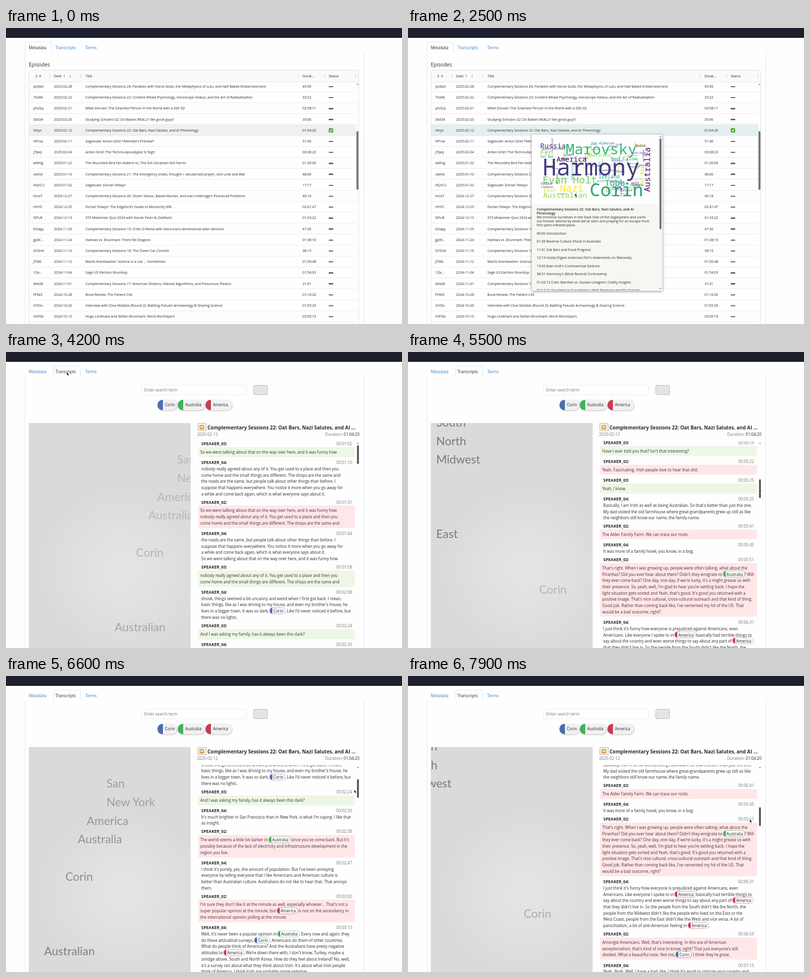
Animation, 800 px wide and 600 px high, one loop 8000 ms. Source, as an HTML page:

```html
<!DOCTYPE html>
<html lang="en">
<head>
<meta charset="utf-8">
<title>Episode browser</title>
<style>
html, body { margin: 0; width: 100%; height: 100%; overflow: hidden; }
#stage { position: relative; width: 800px; height: 600px; overflow: hidden; background: #fefefe;
  font: 6.95px/12px "Open Sans", "Noto Sans", sans-serif; color: #2a2a2e; }
#stage div { position: absolute; box-sizing: border-box; }
.t { white-space: pre; height: 12px; }
.m { font-weight: 500; }
.b { font-weight: 600; }
.bb { font-weight: 700; }
.s8 { font-size: 8.05px; }
.blue { color: #2f7fd0; }
.grey { color: #75757a; }
.line { background: #e4e6ea; }
.thumb { background: #77777d; border-radius: 2px; }
.up, .down { width: 4px; height: 2px; background: #66666c; clip-path: polygon(50% 0, 100% 100%, 0 100%); }
.down { transform: scaleY(-1); }
u { color: #2f74c8; text-underline-offset: 1px; text-decoration-thickness: .6px; }
.cloud { font-family: "Noto Sans Mono", "DejaVu Sans Mono", monospace; white-space: pre; line-height: 1; }
.word { font: 23.3px/30px Lato, "Open Sans", sans-serif; color: #404044; white-space: pre; }
.tag { padding: 0 3px 0 7px; border-radius: 5px; color: #2a2a2e; box-shadow: 0 0 3px var(--c);
  background: linear-gradient(90deg, var(--c) 5px, #fafafa 5px); }
.pill { height: 21px; border-radius: 10px; box-shadow: 1px 1px 3px #bbbbbf; overflow: hidden;
  background: linear-gradient(90deg, var(--c) 11px, #f1f1f2 11px); }
</style>
</head>
<body>
<div id="stage"></div>
<script>
const LOOP = 8000;
const stage = document.getElementById('stage');

function box(parent, x, y, w, h, css = '', cls = '') {
  const el = document.createElement('div');
  el.className = cls;
  el.style.cssText = `left:${x}px;top:${y}px;width:${w}px;height:${h}px;${css}`;
  parent.append(el);
  return el;
}

// Text whose middle line is at y.
function text(parent, x, y, html, cls = '', css = '') {
  const el = document.createElement('div');
  el.className = 't ' + cls;
  el.style.cssText = `left:${x}px;top:${y - 6}px;${css}`;
  el.innerHTML = html;
  parent.append(el);
  return el;
}

// Clipped window whose contents still use stage coordinates.
function view(parent, x, y, w, h, css = '') {
  return box(box(parent, x, y, w, h, 'overflow:hidden;' + css), -x, -y, 800, 600);
}

const layer = () => box(stage, 0, 0, 800, 600);

// Value on a track of [time, value, ...] stops, with optional easing.
function track(stops, t, ease = p => p) {
  let i = 0;
  while (i < stops.length - 2 && t >= stops[i + 1][0]) i++;
  const [a, b] = [stops[i], stops[i + 1]];
  const p = ease(Math.min(1, Math.max(0, (t - a[0]) / (b[0] - a[0]))));
  return a.slice(1).map((v, k) => v + (b[k + 1] - v) * p);
}
const smooth = p => p * p * (3 - 2 * p);

// ---- Frame and tabs
box(stage, 0, 0, 800, 20, 'background:#1e1f2d');
box(stage, 37.5, 49, 1, 551, '', 'line');
box(stage, 722, 49, 1, 551, '', 'line');
const tabBox = box(stage, 38, 28, 53, 22, 'border:1px solid #e4e6ea;border-bottom:0;border-radius:3px 3px 0 0');
const tabs = [['Metadata', 46], ['Transcripts', 100], ['Terms', 160]]
  .map(([name, x]) => text(stage, x, 39.5, name, 's8'));

// ---- Metadata page
const CS = 'Complementary Sessions ';
const TITLE = CS + '22: Oat Bars, Nazi Salutes, and AI Phrenology';
const episodes = [
  ['qU6ah', '2025-02-28', CS + '24: Parables with Norse Gods, the Metaphysics of Lulu, and Half Baked Embarrassment', '45:56'],
  ['7sVAK', '2025-02-22', CS + '23: Content Whale Psychology, Horoscope Haikus, and the Art of Radicalisation', '33:22'],
  ['yhzQq', '2025-02-21', 'Mikel Dorvan: The Smartest Person in the World with a 200 IQ!', '02:58:11'],
  ['S6d34', '2025-02-20', 'Studying Scholars 32: Do Babies REALLY like good guys?', '35:06'],
  ['Veiyn', '2025-02-12', TITLE, '01:04:20'],
  ['NPrxa', '2025-02-11', 'Sagescale: Anton Griel *Members Preview*', '51:40'],
  ['j7Jwq', '2025-02-04', 'Anton Griel: The Techno-Apocalypse is Nigh', '03:08:23'],
  ['w6lHg', '2025-01-22', 'The Wounded Bird Fen Alderin vs. The Evil Ukrainian Bot Farms', '01:20:00'],
  ['cwfo0', '2025-01-10', CS + '21: The emergency snake, thought = secularised prayer, and Love and War', '48:00'],
  ['HQrCU', '2025-01-02', 'Sagescale: Dorian Felwyn', '17:17'],
  ['hrosT', '2024-12-27', CS + "20: Stolen Valour, Based Murder, and Ivan Holbridge's Phonecall Problems", '40:18'],
  ['rlhYD', '2024-12-25', "Dorian Felwyn: The Edgelord's Guide to Monarchy 90K", '02:41:47'],
  ['5iPuR', '2024-12-13', 'STS Midwinter Quiz 2024 with Norah Pevin &amp; Oddfacts', '01:33:22'],
  ['bOapy', '2024-11-29', CS + '19: Critic-O-Rama with extra trans-dimensional alien demons', '47:30'],
  ['gpW…', '2024-11-24', 'Hallows vs. Brunmark: There Be Dragons', '01:38:10'],
  ['GYSH4', '2024-11-16', CS + '18: The Clown Car Cometh', '38:15'],
  ['JTlWL', '2024-11-12', 'Marlis Krantzweiler: Science is a Liar ... Sometimes', '01:50:48'],
  ['1Qx…', '2024-11-04', 'Sage US Election Roundup', '01:54:03'],
  ['dhk06', '2024-11-01', CS + '17: American Dreams, Vidnest Algorithms, and Poisonous Plastics', '31:31'],
  ['FF6k5', '2024-10-28', 'Book Review: The Patient Cell', '01:16:20'],
  ['OiY0o', '2024-10-20', 'Interview with Clive Mobble (Round 2): Battling Pseudo Archaeology &amp; Sharing Science', '01:55:29'],
  ['rNFGb', '2024-10-15', 'Hugo Lindmark and Stefan Brunmark: Word Worshipers', '03:05:19'],
];
const ROW = 22.2, TOP = 107.6, PICKED = 4;
const meta = layer();
text(meta, 46, 73.5, 'Episodes', 'm', 'font-size:10.3px');
box(meta, 46, 85, 667, 540, 'border:1px solid #dfe1e5;border-radius:4px');
box(meta, 47, 86, 665, 24, 'background:#fafafb;border-bottom:1px solid #e8e9ec');
[['2  4', 59], ['Date  1', 97], ['Title', 160.5], ['Durat…', 599], ['Status', 652]]
  .forEach(([s, x]) => text(meta, x, 97.5, s, 'm'));
text(meta, 127, 97, '↓', '', 'font-size:9px');
[88, 151, 590, 643, 706].forEach(x => box(meta, x, 93, 1, 9, 'background:#d5d6da'));

const rows = episodes.map(([id, date, title, length], i) => {
  const y = TOP + ROW * i;
  const row = box(meta, 47, y, 661, ROW, 'border-bottom:1px solid #ebecef');
  const mid = y + ROW / 2 + .3;
  [[id, 55], [date, 97], [title, 160.5], [length, 599]].forEach(([s, x]) => text(meta, x, mid, s));
  if (i === PICKED) {
    box(meta, 652, mid - 4.5, 9, 9, 'background:#4cab3e;border-radius:1.5px').innerHTML =
      '<svg width="9" height="9" style="display:block"><path d="M2 4.6L3.8 6.6L7 2.2" fill="none" stroke="#fff" stroke-width="1.3"/></svg>';
  } else box(meta, 652, mid - 1.3, 9, 2.6, 'background:#626267;border-radius:.5px');
  return row;
});
box(meta, 708, 113, 4, 2, '', 'up');
box(meta, 708, 209, 4, 119, '', 'thumb');

// ---- Popup
const popup = box(meta, 0, 0, 800, 600);
box(popup, 250, 215.5, 264, 317, 'background:#f6f6f2;box-shadow:0 1px 5px #8a8a90');
const popView = view(popup, 250, 216, 257, 316);
const popBody = box(popView, 0, 0, 800, 600);
box(popBody, 250, 216, 257, 141, 'background:#fefefe');

// Centre of the word, size, colour, quarter turn.
function cloudWord(s, x, y, size, color, turned) {
  const el = document.createElement('div');
  el.className = 'cloud';
  el.style.cssText = `left:${x}px;top:${y}px;font-size:${size}px;color:${color};` +
    `transform:translate(-50%,-50%)${turned ? ' rotate(-90deg)' : ''}`;
  el.textContent = s;
  popBody.append(el);
}
let seed = 7;
const rand = () => (seed = seed * 16807 % 2147483647) / 2147483647;
const tints = ['#90d743', '#35b779', '#443983', '#d8e219', '#31688e', '#481f70'];
const tiny = ['culture', 'people', 'Ireland', 'think', 'podcast', 'America', 'audience', 'Northern', 'idea', 'Great', 'world'];
for (let i = 0; i < 75; i++) {
  cloudWord(tiny[i % tiny.length], 276 + rand() * 200, 233 + rand() * 106, 3.6 + rand() * 1.8, tints[i % 6], rand() < .4);
}
[
  ['Russia', 293, 239, 14.4, '#482878'], ['Marovsky', 390, 244.5, 29.8, '#35b779'],
  ['Fen', 280, 252, 14.4, '#90d743'], ['America', 330.5, 265, 14.5, '#440154'],
  ['Harmony', 370, 281, 46.7, '#443983'], ['Evan Holt', 327, 307, 20.4, '#6ece58'],
  ['Tobb', 418, 313, 17, '#1f9e89'], ['Corin', 421, 328, 36, '#28a374'],
  ['Nazi', 331, 325, 20, '#fde725'], ['Australian', 317.5, 338, 14.8, '#90d743'],
  ['Australia', 483, 287, 16.8, '#450b58', 1], ['Ned Calow', 436.5, 265, 9.8, '#2fa97f'],
  ['Ireland', 406, 301, 10, '#1f9e89'], ['Americans', 386, 258, 8.7, '#6ece58'],
  ['Volin', 279.5, 316, 7.7, '#443983'], ['Lindgren', 281, 322.5, 5.2, '#443983'],
  ['Fen Alderien', 394, 234, 6.5, '#31688e'], ['Gurus', 470, 237.5, 7, '#440154'],
  ['Dune Harbor', 469, 253, 4.7, '#443983'], ['Rupert Hallowes', 294, 246, 5.2, '#31688e'],
  ['Oat Bar', 281, 260.5, 6.4, '#21918c'], ['South', 323, 258, 6.5, '#1f9e89'],
  ['Truth', 286, 328.5, 8, '#d8e219'], ['Holt', 459, 314.5, 6.6, '#440154'],
  ['Oat Bars', 473, 297, 9.4, '#c2df23', 1], ['American', 332, 290, 7.5, '#35b779', 1],
].forEach(w => cloudWord(...w));

const put = (y, s, cls) => text(popBody, 260, y, s, cls);
TITLE.split(/ (?=Phren)/).forEach((s, i) => put(367.5 + 8.2 * i, s, 'b'));
['We immerse ourselves in the Dark Side of the Sagesphere and come',
 "out forever altered by what we've seen and praying for an escape from",
 'this spirit-infested place.'].forEach((s, i) => put(384 + 8.1 * i, s));
['00:00 Introduction', '01:38 Reverse Culture Shock in Australia', '11:01 Oat Bars and Food Progress',
 "12:14 Vostia Digest endorses Fen's statements on Marovsky", "19:20 Evan Holt's Controversial Gesture",
 "38:31 Harmony's (Most Recent) Controversy", '01:02:12 Colin Marsten vs. Gustav Lindgren: Civility Insights',
 '01:14:21 Sacrilegious Sycophancy: Walt Fenmore and Kip Dorsen', "01:15:55 Frederic Valmon's Sunportal Theories",
 '01:26:52 Leaving the Spirit Infested World', 'The full episode is available for Fundnik subscribers (1hrs 30 mins).',
 'Join us at: <u>https://www.example.com/ReadingTheSages</u>', '<b class="b">Sources</b>',
].forEach((s, i) => put(416.5 + 16.52 * i, s));
['*<u>Vostia Digest posting about Fen</u> and <u>announcing his upcoming</u>', '<u>interview with Volin</u>',
 '*<u>Ned Calow Encounters #2260 - Fen Alderin</u>', "*<u>Video comparing Holt's gesture with other politicians' gestures</u>",
 "*<u>Nola's statement about the lawsuit on her bulletin and Harmony's</u>", '<u>response on his webforum</u>',
 "*<u>Colin Marsten and Lindgren's Chirrup Exchange</u>", "*<u>Walt Fenmore suggesting Brant's achievements are greater than</u>",
 "<u>God's</u>", "*<u>Frederic Valmon's thread on Sunportals</u>",
].forEach((s, i) => {
  const y = 631.5 + 8.05 * i;
  if (s[0] === '*') box(popBody, 270, y - 1, 2.4, 2.4, 'background:#2a2a2e;border-radius:2px');
  text(popBody, 277, y, s.replace('*', ''));
});
box(popup, 508, 219, 4, 2, '', 'up');
box(popup, 508, 527, 4, 2, '', 'down');
const popThumb = box(popup, 508, 224, 4, 184, '', 'thumb');

// ---- Transcripts page
const trans = layer();
const tags = { C: ['Corin', '#4a6db0'], A: ['Australia', '#3fb45c'], U: ['America', '#c63d52'] };
box(trans, 273, 67, 214, 20, 'border:1px solid #ececef;border-radius:3px');
text(trans, 279.5, 77, 'Enter search term', 's8 grey');
box(trans, 500, 67, 29, 20, 'border:1px solid #b9bcc1;border-radius:3px;background:#e2e4e7');
[['C', 306, 39], ['A', 347, 54], ['U', 403, 53]].forEach(([k, x, w]) => {
  box(trans, x, 96.5, w, 21, `--c:${tags[k][1]}`, 'pill');
  text(trans, x + 15, 107, tags[k][0], 's8');
});

const wordView = view(trans, 46, 144, 327, 456,
  'background:radial-gradient(circle at 190px 296px,#e5e5e6 0,#e1e1e2 70px,#dadadb 170px)');

box(trans, 386.5, 144, 18, 16, 'border:1px solid #b4b4b8;border-radius:2px;background:#f0f0f1');
box(trans, 390.5, 147.5, 9.5, 9, 'background:#f39a1e;border-radius:1.5px');
[393, 396].forEach(x => box(trans, x, 150, 1.5, 4, 'background:#fff3e0'));
text(trans, 407, 152.5, TITLE.replace(/Phren.*/, '…'), 'bb', 'font-size:9.9px');
text(trans, 386, 167, '2025-02-12', 's8 grey');
text(trans, 0, 167, '<span class="grey">Duration:</span> 01:04:20', 's8', 'left:auto;right:86px');

const pool = [
  'So we were talking about that on the way over here, and it was funny how',
  'nobody really agreed about any of it. You get used to a place and then you',
  'come home and the small things are different. The shops are the same and',
  'the roads are the same, but people talk about other things than before. I',
  'suppose that happens everywhere. You notice it more when you go away for',
  'a while and come back again, which is what everyone says about it.',
];
// Speaker, time, then text lines or a number of lines of small talk.
const talk = [
  ['3', '01:02', 1], ['4', '01:10', 5], ['2', '01:31', 3], ['4', '01:44', 4], ['3', '01:58', 2],
  ['4', '02:08', "shook, things seemed a bit uncanny and weird when I first got back. I mean,|basic things, like as I was driving to my house, and even my brother's house, he|lives in a bigger town. It was so dark, {C}. Like I'd never noticed it before, but|there was no lights."],
  ['3', '02:24', 'And I was asking my family, has it always been this dark?'],
  ['4', '02:30', "It's much brighter in San Francisco than in New York, is what I'm saying. I like that|as insight."],
  ['2', '02:38', "The world seems a little bit darker in {A} since you've come back. But it's|possibly because of the lack of electricity and infrastructure development in the|region you live."],
  ['4', '02:47', "I think it's purely, yes, the amount of population. But I've been annoying|everyone by telling everyone that I like Americans and American culture is|better than Australian culture. Australians do not like to hear that. That annoys|them."],
  ['2', '03:00', "I'm sure they don't like it at the minute as well, especially whoever... That's not a|super popular opinion at the minute, but {U} is not on the ascendancy in|the international opinion polling at the minute."],
  ['4', '03:13', "Well, it's never been a popular opinion in {A}. Every now and again, they|do these attitudinal surveys, {C}. Americans do them of other countries.|What do people think of Americans? And the Australians have pretty negative|attitudes to {U}. We're down there with, I don't know, Turkey, maybe a|smidge above. South and North Korea. How do they feel about Ireland? No, well,|it's a survey not about what they think about Irish. It's about what Irish people|think of America. I think Irish are probably more negative|than most."],
  ['2', '03:52', 3], ['4', '04:08', 5], ['3', '04:31', 1], ['4', '04:36', 6], ['2', '05:02', 1], ['4', '05:08', 2],
  ['3', '05:19', "Have I ever told you that? Isn't that interesting?"],
  ['2', '05:22', 'Yeah. Fascinating. Irish people love to hear that shit.'],
  ['3', '05:25', 'Yeah, I know.'],
  ['4', '05:25', "Basically, I am Irish as well as being Australian. So that's better than just the one.|My dad visited the old farmhouse where great-grandparents grew up still as like|the neighbors still know our name, the family name."],
  ['2', '05:41', 'The Alder Family Farm. We can trace our roots.'],
  ['4', '05:45', 'It was more of a family hovel, you know, in a bog.'],
  ['2', '05:51', "That's right. When I was growing up, people were often talking, what about the|Piranhas? Did you ever hear about them? Didn't they emigrate to {A}? Will|they ever come back? One day, one day, if we're lucky, it's a might grease us with|their presence. So, yeah, well, I'm glad to hear you're settling back. I hope the|light situation gets sorted and Yeah, that's good. It's good you returned with a|positive image. That's nice cultural, cross-cultural outreach and that kind of thing.|Good job. Rather than coming back like, I've cemented my hit of the US. That|would be a bad outcome, right?"],
  ['4', '06:31', "I just think it's funny how everyone is prejudiced against Americans, even|Americans. Like everyone I spoke to in {U} basically had terrible things to|say about the country and even worse things to say about any part of {U}|that they didn't live in. So the people from the South didn't like the North, the|people from the Midwest didn't like the people who lived on the East or the|West Coast, people from the East didn't like the West and vice versa. A lot of|parochialism, a lot of anti-American feeling in {U}."],
  ['2', '06:59', "Amongst Americans. Well, that's interesting. In this era of American|exceptionalism, that's kind of nice to know, right? That just everyone's still|divided. What a beautiful note. Not me, {C}. I think they're great."],
  ['4', '07:15', "Yeah. Yeah. Well, I have a bad, like, I think it's good to criticize your country and"],
];
// Fill and ink of the shaded speakers.
const shades = { 2: ['#ffe7e9', '#4d2c33'], 3: ['#eef6e6', '#2f3a2c'] };
const talkView = view(trans, 386, 181, 321, 419);
const talkBody = box(talkView, 0, 0, 800, 600);
const LINE = 12.72, headAt = {};
let flowY = 186, next = 0;
for (const [who, time, said] of talk) {
  const lines = typeof said === 'string' ? said.split('|')
    : Array.from({ length: said }, () => pool[next++ % pool.length]);
  const shade = shades[who];
  headAt[time] = flowY;
  text(talkBody, 394.5, flowY, `SPEAKER_0${who}:`, 'bb', 'font-size:8.5px');
  text(talkBody, 0, flowY, '00:' + time, 's8 grey', 'left:auto;right:101px');
  const first = flowY + (shade ? 16.8 : 12.8), last = first + LINE * (lines.length - 1);
  if (shade) box(talkBody, 388, first - 10, 317, last - first + 20, `background:${shade[0]}`);
  lines.forEach((s, i) => text(talkBody, shade ? 392.5 : 394.5, first + LINE * i,
    s.replace(/\{(.)\}/g, (_, k) => `<span class="tag" style="--c:${tags[k][1]}">${tags[k][0]}</span>`),
    's8', shade ? `color:${shade[1]}` : ''));
  flowY = last + (shade ? 21.2 : 17);
}
const early = headAt['02:24'] - 235, late = headAt['05:19'] - 183.5, end = headAt['05:41'] - 222.3;
box(trans, 709, 184, 4, 2, '', 'up');
const talkThumb = box(trans, 709, 209, 4, 38, 'background:#5c5c62', 'thumb');

// Term, x at its reference scroll, y, reference scroll, drift per scrolled pixel.
const words = [
  ['San', 203, 217, early], ['New York', 203, 255, early], ['America', 163, 292.5, early],
  ['Australia', 145, 330, early], ['Corin', 120, 405.5, early], ['Australian', 77, 556.5, early],
  ['South', 57, 142, late], ['North', 57, 179.5, late], ['Midwest', 57, 217, late],
  ['East', 57, 368, late], ['Corin', 265, 481, late, .24],
].map(([s, x, y, ref, rate = .446]) => {
  const el = box(wordView, 46 - 46, y - 15, 200, 30, '', 'word');
  el.textContent = s;
  return { el, x, ref, rate };
});

// ---- Pointer
const cursor = box(stage, 0, 0, 8, 10);
cursor.innerHTML = '<svg width="8" height="10" style="display:block"><path d="M.4 .4V7L1.9 5.7L3 8.1L4.1 7.6L3.1 5.3H5.1Z" fill="#18181c" stroke="#fff" stroke-width=".4"/></svg>';

const path = [[100, 262, 520], [1000, 241, 235], [1150, 244, 208], [1700, 250, 209], [2400, 337, 335], [3150, 337, 335],
  [3480, 317, 212], [3640, 317, 212], [3950, 121, 40], [4200, 121, 40], [4600, 731, 190], [4800, 709, 212],
  [5500, 709, 278], [6600, 703, 230], [7900, 690, 290]];
const popScroll = [[2600, 0], [3200, 201.5]];
const talkScroll = [[4800, 0], [5500, late], [6600, early], [7900, end]];
const OPEN = 1300, CLOSE = 3750, SWITCH = 4100, DRAG = 4800;

function drawMeta(t) {
  const [x, y] = track(path, t - 60);
  const over = Math.floor((y - TOP) / ROW);
  const shown = t >= OPEN && t < CLOSE;
  const inPopup = shown && x > 250 && y > TOP + ROW * (PICKED + 1);
  rows.forEach((row, i) => {
    const hover = t >= 100 && !inPopup && i === over;
    row.style.background = hover ? '#d4edf3' : i !== PICKED ? 'none' : inPopup ? '#e4eff0' : '#f0f0f1';
  });
  popup.style.display = shown ? '' : 'none';
  const [s] = track(popScroll, t, smooth);
  popBody.style.transform = `translateY(${-s}px)`;
  popThumb.style.top = 224 + s * 117 / 201.5 + 'px';
}

function drawTalk(t) {
  const [s] = track(talkScroll, t, smooth);
  talkBody.style.transform = `translateY(${-s}px)`;
  talkThumb.style.top = 209 + (s - early) * 49 / (late - early) + 'px';
  for (const { el, x, ref, rate } of words) {
    const left = x - (s - ref) * rate;
    el.style.transform = `translateX(${left}px)`;
    el.style.opacity = Math.max(.22, Math.min(.62, .72 - left * .0017));
  }
}

function draw(t) {
  const second = t >= SWITCH;
  meta.style.display = second ? 'none' : '';
  trans.style.display = second ? '' : 'none';
  tabBox.style.left = second ? '96px' : '38px';
  tabBox.style.width = second ? '55px' : '54px';
  tabs.forEach((tab, i) => tab.classList.toggle('blue', i !== +second));
  if (second) drawTalk(t); else drawMeta(t);
  const [x, y] = track(path, t, t > DRAG ? smooth : undefined);
  cursor.style.display = t < 100 ? 'none' : '';
  cursor.style.transform = `translate(${x}px,${y}px)`;
}

function tick() {
  draw(performance.now() % LOOP);
  requestAnimationFrame(tick);
}
tick();
</script>
</body>
</html>
```
